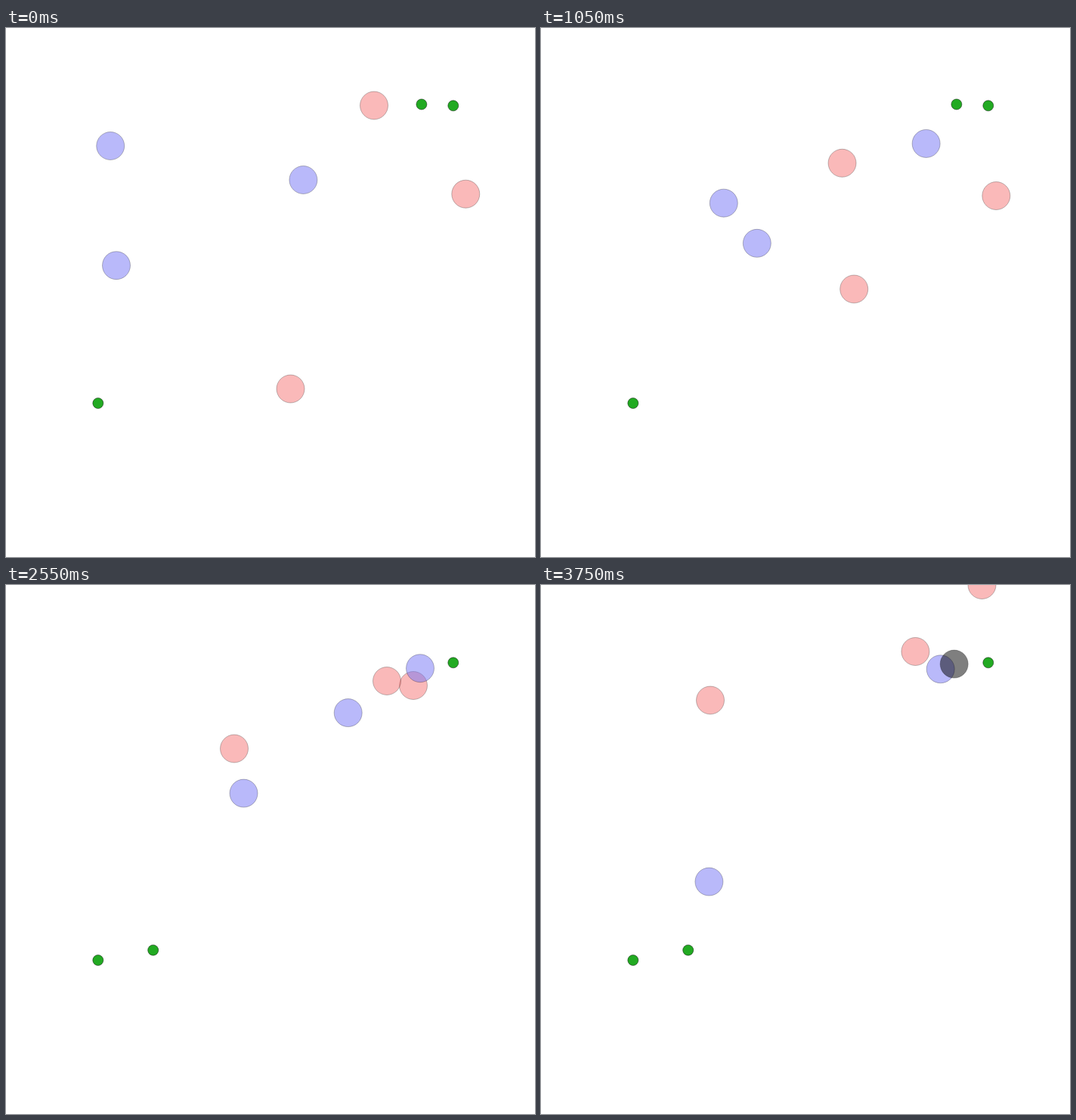
Recreate the animation shown at these times as an HTML page with a canvas. Size 700 by 700 pixels, loop 3900 ms.

```html
<!DOCTYPE html>
<html lang="en">
<head>
<meta charset="utf-8">
<title>Flock and hunters</title>
<style>
  html, body { margin: 0; width: 100%; height: 100%; overflow: hidden; background: #fff; }
  canvas { display: block; }
</style>
</head>
<body>
<canvas width="700" height="700"></canvas>
<script>
const ctx = document.querySelector('canvas').getContext('2d');
const TICK = 150, TICKS = 26, CAUGHT = 19, EATEN = 10;
const TIMES = [0, 5, 9, 13, 17, 21, 25];
const RED = 'rgba(245,117,117,.5)', BLUE = 'rgba(117,117,245,.5)', DEAD = 'rgba(0,0,0,.5)';

// Smooth curve through the waypoints, with quadratic end tangents
function curve(times, values) {
  const last = times.length - 1;
  const slope = i => (values[i + 1] - values[i]) / (times[i + 1] - times[i]);
  const inner = i => {
    const a = times[i] - times[i - 1], b = times[i + 1] - times[i];
    return (slope(i - 1) * b + slope(i) * a) / (a + b);
  };
  const tangent = i => i === 0 ? 2 * slope(0) - inner(1)
    : i === last ? 2 * slope(last - 1) - inner(last - 1) : inner(i);
  return t => {
    if (t >= times[last]) return values[last];
    let i = 0;
    while (t >= times[i + 1]) i++;
    const h = times[i + 1] - times[i], u = (t - times[i]) / h, v = 1 - u;
    return v * v * (1 + 2 * u) * values[i] + u * u * (3 - 2 * u) * values[i + 1]
      + h * u * v * (v * tangent(i) - u * tangent(i + 1));
  };
}

const path = (points, times = TIMES) => ({
  x: curve(times, points.map(p => p[0])),
  y: curve(times, points.map(p => p[1]))
});

const hunters = [
  path([[487, 102.5], [435.5, 158.3], [363.5, 196], [334.5, 214], [302, 216.5], [263.5, 183.8], [224, 152.5]]),
  path([[608.3, 219.7], [604.4, 218.5], [599.4, 220], [589.4, 175], [539, 133], [510.3, 64.7], [495.4, 88]]),
  path([[376.5, 477.5], [400.3, 387.8], [429.4, 299.8], [460, 199.2], [504, 127], [554.5, 76.3], [583.5, 0]])
];
const victim = path([[393.4, 201], [488.3, 175.3], [524.6, 131.5], [545, 115.7], [548, 110.2], [546.7, 104.6]],
  [0, 5, 9, 13, 17, CAUGHT]);
const prey = [
  path([[138.2, 156], [204.8, 211], [283.5, 245], [377.5, 229.3], [452.7, 169.1], [514.4, 122.2], [528.7, 111.3]]),
  path([[146, 314.2], [258.5, 305.3], [303.8, 263.7], [314, 247.3], [314.5, 275.6], [275.8, 341.2], [222.4, 392.6]])
];

function disc(x, y, r, fill, line) {
  ctx.beginPath();
  ctx.arc(x, y, r, 0, 2 * Math.PI);
  ctx.fillStyle = fill;
  ctx.fill();
  ctx.strokeStyle = line;
  ctx.stroke();
}

const food = (x, y) => disc(x, y, 7, '#22aa22', 'rgba(0,0,0,.45)');

function draw(now) {
  const t = Math.floor(now / TICK) % TICKS;
  const creature = (p, fill) => disc(p.x(t), p.y(t), 18.5, fill, 'rgba(0,0,0,.25)');
  ctx.clearRect(0, 0, 700, 700);
  food(591.8, 102.8);
  food(121.8, 496.5);
  if (t < EATEN) food(549.9, 101);
  else food(194.7, 483.2);
  hunters.forEach(p => creature(p, RED));
  prey.forEach(p => creature(p, BLUE));
  creature(victim, t < CAUGHT ? BLUE : DEAD);
  requestAnimationFrame(draw);
}

const start = performance.now();
const loop = draw;
draw = now => loop(Math.max(0, now - start));
draw(start);
</script>
</body>
</html>
```
